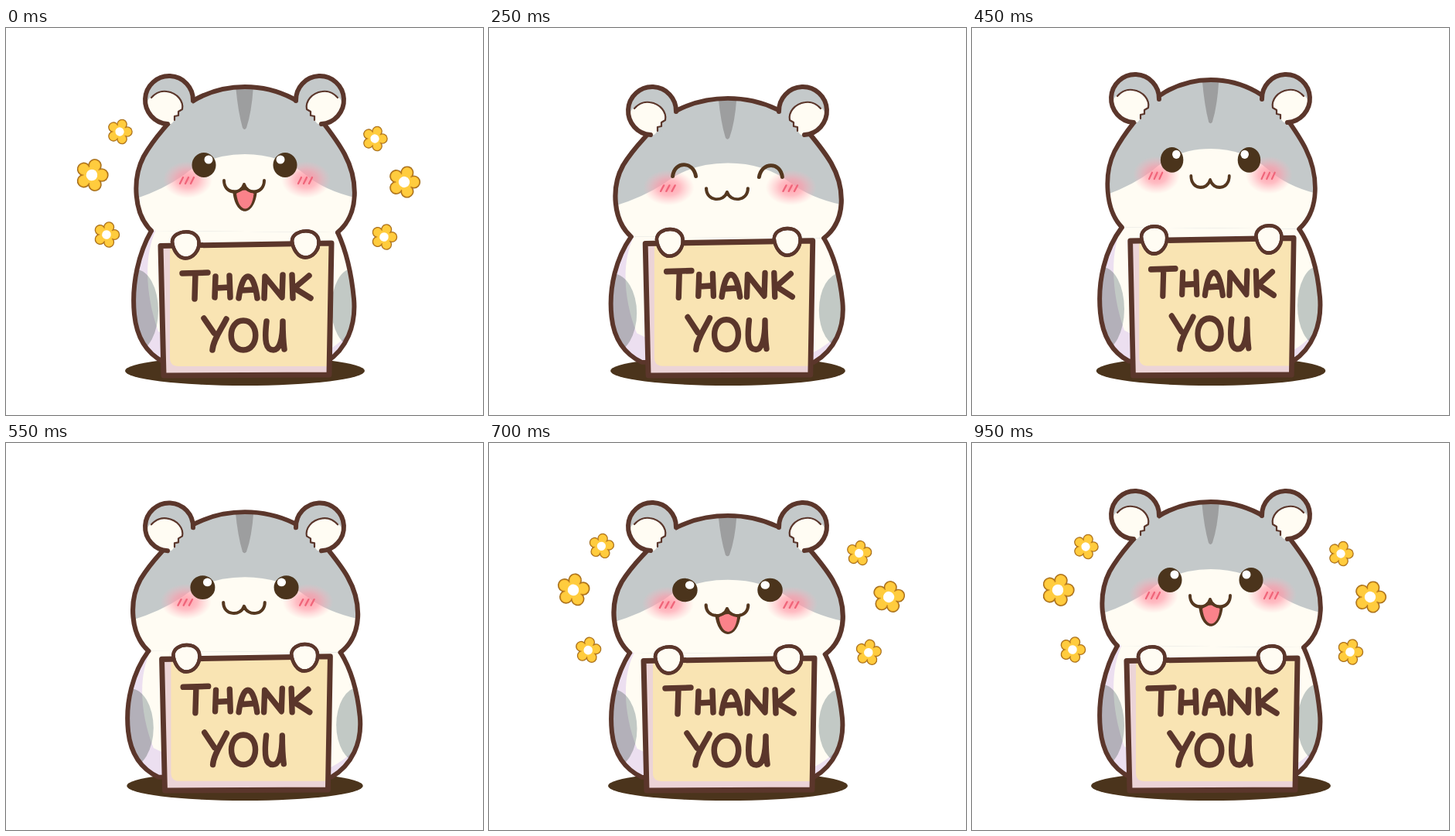
These frames come from a looping animation (617 px wide and 500 px high, 1 s). An HTML page:

```html
<!DOCTYPE html>
<html lang="en">
<head>
<meta charset="utf-8">
<title>Thank you hamster</title>
<style>
html, body { margin: 0; width: 100%; height: 100%; overflow: hidden; background: #fff; }
svg { display: block; width: 100%; height: 100%; }
.line { fill: none; stroke: #5b362b; stroke-width: 6; stroke-linecap: round; stroke-linejoin: round; }
.thin { stroke-width: 2.2; }
.mouth { stroke: #54371f; stroke-width: 4; }
.cream { fill: #fffcf3; }
.grey { fill: #c4c9ca; }
.hip { fill: #c2c9c5; }
.shade { fill: #ecdff0; mix-blend-mode: multiply; }
.dark { fill: #4b341c; }
</style>
</head>
<body>
<svg viewBox="0 0 617 500">
  <defs>
    <radialGradient id="pink">
      <stop offset="0" stop-color="#ff8f9f" stop-opacity=".85"/>
      <stop offset=".45" stop-color="#ff9cab" stop-opacity=".65"/>
      <stop offset="1" stop-color="#ffb4c0" stop-opacity="0"/>
    </radialGradient>
    <path id="skull" d="M188 262C165 240 163 195 178 166C190 145 200 135 209 124C225 100 262 76 309 76C356 76 392 100 410 122C420 135 430 148 438 163C455 195 458 240 429 264"/>
    <clipPath id="inHead"><use href="#skull"/></clipPath>
    <clipPath id="inBody"><path class="bodyPath"/></clipPath>
    <clipPath id="inEar"><circle cx="211" cy="93" r="31"/></clipPath>
    <g id="ear">
      <circle class="grey" cx="211" cy="93" r="31"/>
      <path class="cream" clip-path="url(#inEar)" d="M178 104C184 86 198 81 208 82C222 84 230 95 228 105l-5 3l0 5l-5 1l0 5L214 124L190 130Z"/>
      <path class="line thin" d="M188 90C194 83 202 81 208 82C222 84 230 95 228 105l-5 3l0 5l-5 1l0 5"/>
      <path class="line" d="M242 94A31 31 0 1 0 209 124"/>
    </g>
    <g id="eye">
      <ellipse class="dark" cx="256" cy="177" rx="15.5" ry="16"/>
      <circle cx="262" cy="170" r="5.5" fill="#fff"/>
    </g>
    <path id="shut" class="line mouth" style="stroke-width:4.8" d="M240 181C242 160 266 160 269 181"/>
    <g id="cheek">
      <ellipse cx="235" cy="196" rx="32" ry="24" fill="url(#pink)"/>
      <path d="M225 201l4-8m3 8l4-8m3 8l4-8" fill="none" stroke="#f0657a" stroke-width="2.3" stroke-linecap="round"/>
    </g>
    <g id="paw">
      <path id="pad" class="cream" d="M-17-4C-16-20 17-22 17.5-3C18 8 10 17.5 0 17.5C-9 17.5-16 7-17-4Z"/>
      <path fill="#ebdcf0" d="M14-12C20-2 16 17 0 17.5C-5 17-8 15-11 11C4 13 13 3 14-12Z"/>
      <use href="#pad" class="line" style="fill:none;stroke-width:4.5"/>
      <path class="line" style="stroke-width:4.5" d="M-17-4C-16-20 17-22 17.5-3C18 8 10 17.5 0 17.5C-9 17.5-16 7-17-4Z"/>
    </g>
    <g id="flower"></g>
  </defs>

  <ellipse id="shadow" class="dark" cx="309" cy="443" rx="155" ry="19"/>

  <g id="body">
    <path class="bodyPath cream"/>
    <g clip-path="url(#inBody)">
      <g id="belly">
        <ellipse class="hip" cx="168" cy="365" rx="29" ry="53"/>
        <ellipse class="hip" cx="448" cy="361" rx="27" ry="50"/>
        <path class="shade" d="M150 255L197 255C177 290 180 345 197 392Q300 450 410 420Q440 405 456 375V450H150Z"/>
      </g>
    </g>
    <path class="bodyPath line"/>
  </g>

  <g id="head">
    <use href="#skull" class="grey"/>
    <g clip-path="url(#inHead)">
      <path class="cream" d="M160 223Q200 211 230 190Q262 163 309 163Q355 163 388 190Q415 212 460 221V300H160Z"/>
      <path fill="#9d9e9f" d="M297 74Q300 108 306 129Q308.500 133 311 129Q318 108 320 74Z"/>
      <use href="#cheek"/>
      <use href="#cheek" x="153"/>
    </g>
    <use href="#skull" class="line"/>
    <g id="open"><use href="#eye"/><use href="#eye" transform="matrix(-1 0 0 1 617 0)"/></g>
    <g id="closed"><use href="#shut"/><use href="#shut" transform="matrix(-1 0 0 1 617 1)"/></g>
    <g id="smile">
      <path fill="#54371f" d="M293 209C296 246 322 246 325 209Q314 212 308 202Q302 212 293 209Z"/>
      <path fill="#fa828a" d="M298 214Q309 205 320.500 214C318 240 301 240 298 214Z"/>
    </g>
    <path class="line mouth" d="M282 197C282 215 304 216 308 202C312 216 334 215 334 197"/>
  </g>

  <g id="ears"><use href="#ear"/><use href="#ear" transform="matrix(-1 0 0 1 617 0)"/></g>

  <g id="sign">
    <path fill="#ecd4d7" d="M200 282L421 278L418 448L204 449Z"/>
    <path fill="#f9e4b3" d="M212 283L420 279L415 437H223Q212 437 212 426Z"/>
    <path class="line" style="stroke-width:7" d="M200 281.500L421 278L418 448L204 449Z"/>
    <path class="line" role="img" aria-label="THANK YOU" style="stroke-width:7.500" d="
      M228 317L261 316M245 317L244 350
      M271 321L270 348M289 320L290 348M271 336L289 335
      M301 349C303 335 307 321 313 321C319 321 323 335 325 349M305 339L321 338
      M334 349L335 321L357 348L358 319
      M370 319L371 349M392 320L373 336L394 349
      M256 375L269 394M285 376C278 390 268 403 267 416
      M307 378C286 378 286 416 307 416C328 416 328 378 307 378Z
      M337 379C334 405 336 416 346 416C354 416 358 402 358 379C358 395 359 408 360 415"/>
    <use href="#paw" x="232" y="280"/>
    <use href="#paw" x="387" y="279"/>
  </g>

  <g id="flowers"></g>
</svg>
<script>
const $ = id => document.getElementById(id);
const MID = 309, FLOOR = 450, STEP = 50, LOOP = 1000;

// time, head width, height, belly width, ear drop, sign width, sign height
const poses = [
  [0, 1, 1, 1, 0, 1, 1],
  [100, 1.109, .9176, 1.09, 26, 1, 1],
  [250, 1.035, .96, 1.052, 14, .98, 1.018],
  [450, .951, 1.024, 1, -2, .957, 1.038],
  [600, 1.07, .935, 1.083, 24, 1, 1],
  [700, 1.049, .952, 1.049, 15, 1, 1],
  [800, 1.015, .985, 1.015, 5, 1, 1],
  [950, 1, 1, 1, 0, 1, 1],
  [1000, 1, 1, 1, 0, 1, 1]
];
// time, spread, size, turn
const bloom = [
  [600, .94, .86, 0],
  [700, 1.01, 1, 10],
  [950, 1, 1, 18],
  [1000, 1, 1, 18]
];
// x, y, size
const spots = [
  [147, 134, 17], [111, 190, 22], [130, 267, 17.5],
  [477, 143, 17], [515, 199, 21.5], [489, 270, 17.5]
];

function at(keys, t) {
  const i = keys.findIndex(k => k[0] > t), a = keys[i - 1], b = keys[i];
  const p = (t - a[0]) / (b[0] - a[0]);
  return a.slice(1).map((v, j) => v + (b[j + 1] - v) * p);
}

const petals = (r, paint) => [0, 1, 2, 3, 4].map(i =>
  `<circle cy="-12" r="${r}" ${paint} transform="rotate(${i * 72})"/>`).join('');
$('flower').innerHTML = petals(8.2, 'fill="#a5701d"') + petals(6.9, 'fill="#f0a92a"') +
  petals(6.2, 'fill="#ffcc3e"') + '<circle r="10" fill="#ffcc3e"/><circle r="6.8" fill="#fff"/>';
$('flowers').innerHTML = spots.map(() => '<use href="#flower"/>').join('');
const blossoms = [...$('flowers').children];

const move = (id, value) => $(id).setAttribute('transform', value);
const show = (id, on) => $(id).style.display = on ? '' : 'none';
const squash = (x, y) =>
  `translate(${MID} ${FLOOR}) scale(${x} ${y}) translate(${-MID} ${-FLOOR})`;

function bodyPath(neck, belly) {
  const n = x => MID + (x - MID) * neck, b = x => MID + (x - MID) * belly;
  return `M${n(188)} 262C${b(172)} 290 ${b(162)} 330 ${b(166)} 370` +
    `C${b(169)} 400 ${b(182)} 420 ${b(203)} 431L${b(415)} 431` +
    `C${b(440)} 415 ${b(453)} 385 ${b(450)} 350C${b(447)} 318 ${b(440)} 288 ${n(429)} 264`;
}

function draw(t) {
  const [wide, tall, belly, drop, signW, signH] = at(poses, t);
  move('head', squash(wide, tall));
  move('body', squash(1, tall));
  move('belly', squash(belly, 1));
  move('ears', `translate(0 ${drop})`);
  move('sign', squash(signW, signH));
  move('shadow', squash(signW, 1));
  const d = bodyPath(wide, belly);
  document.querySelectorAll('.bodyPath').forEach(p => p.setAttribute('d', d));

  const happy = t < 50 || t >= 600, asleep = t >= 50 && t < 350;
  show('open', !asleep);
  show('closed', asleep);
  show('smile', happy);
  show('flowers', happy);
  if (!happy) return;
  const [spread, size, turn] = at(bloom, t < 50 ? 950 : t);
  spots.forEach(([x, y, r], i) => blossoms[i].setAttribute('transform',
    `translate(${MID + (x - MID) * spread} ${200 + (y - 200) * spread}) ` +
    `rotate(${turn}) scale(${r * size / 20.5})`));
}

function tick() {
  draw(Math.floor(performance.now() % LOOP / STEP) * STEP);
  requestAnimationFrame(tick);
}
tick();
</script>
</body>
</html>
```
